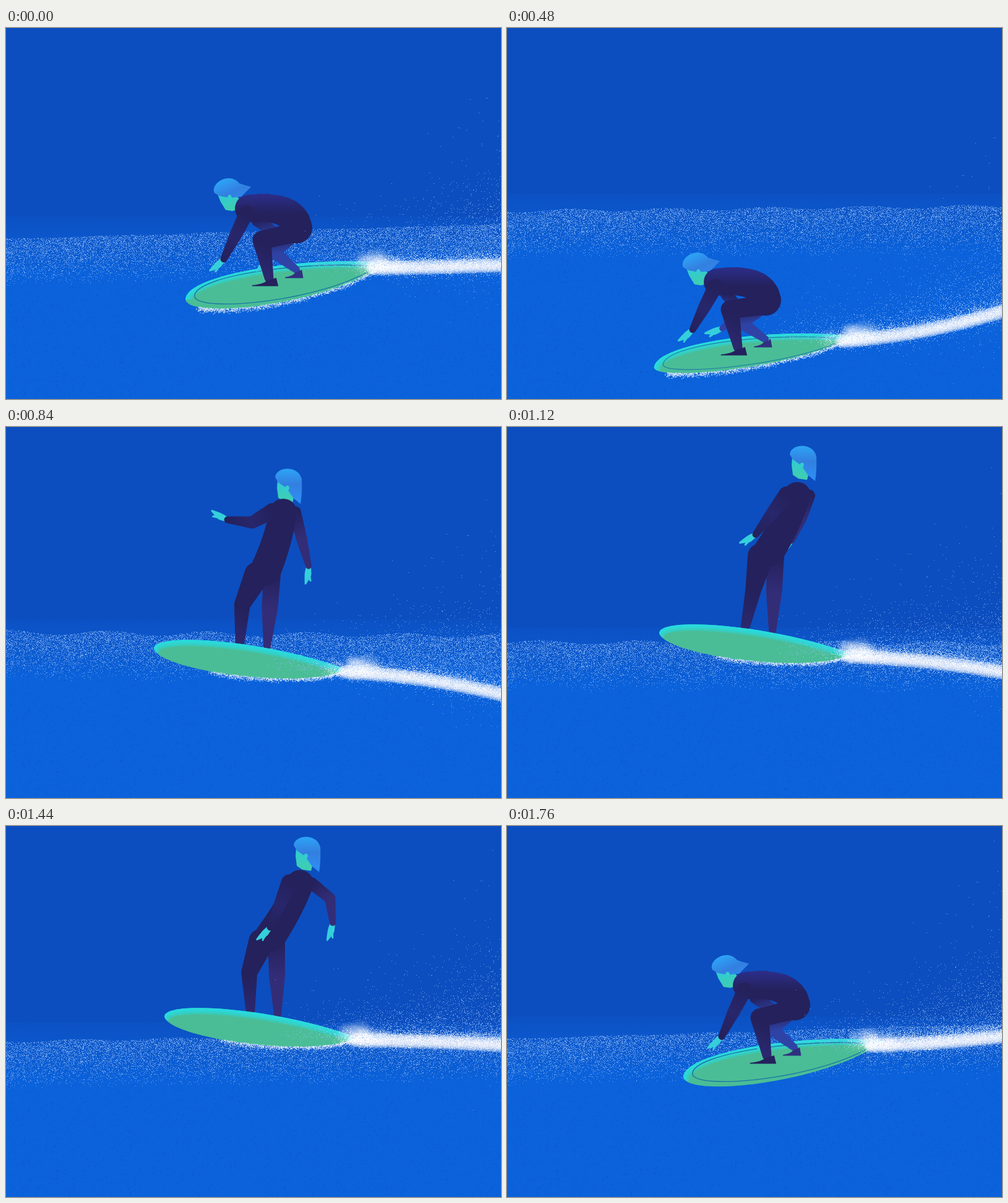
These frames come from a looping animation (800x600 px, 1800 ms). An HTML page with a canvas:

```html
<!DOCTYPE html>
<html>
<head>
<meta charset="utf-8">
<style>
html, body { margin: 0; width: 100%; height: 100%; overflow: hidden; background: #0c4ebf; }
canvas { display: block; }
</style>
</head>
<body>
<canvas id="stage" width="800" height="600"></canvas>
<script>
const ctx = document.getElementById('stage').getContext('2d');
const LOOP = 1800, STEP = 40, NAVY = '#24215c';

// Seeded particles
let seed = 7;
function rnd() {
  seed = (seed + 0x6D2B79F5) | 0;
  let n = Math.imul(seed ^ (seed >>> 15), 1 | seed);
  n = (n + Math.imul(n ^ (n >>> 7), 61 | n)) ^ n;
  return ((n ^ (n >>> 14)) >>> 0) / 4294967296;
}
const make = (n, fn) => Array.from({ length: n }, fn);
const gauss = () => rnd() + rnd() + rnd() + rnd() - 2;
const expo = () => -Math.log(1 - rnd());
const surfaceDots = make(12000, () => [rnd() * 800 | 0, 78 * (1 - Math.sqrt(rnd()))]);
const seaDots = make(3600, () => [rnd() * 800 | 0, 300 + rnd() * 300 | 0]);
const coreDots = make(3200, () => [rnd(), gauss(), gauss()]);
const sprayDots = make(3600, () => [rnd(), rnd() < 0.12 ? expo() * 0.4 : -expo()]);
const foamDots = make(1300, () => [rnd(), gauss(), Math.abs(gauss())]);
const puffs = make(12, () => [rnd(), gauss(), 10 + rnd() * 12]);

const clamp = v => Math.max(0, Math.min(1, v));
const ease = v => { v = clamp(v); return v * v * (3 - 2 * v); };
const mix = (a, b, k) => a + (b - a) * k;
const blend = (a, b, k) => a.map((v, i) => mix(v, b[i], k));
const add = (a, b) => [a[0] + b[0], a[1] + b[1]];
const frac = v => v - Math.floor(v);

// Time, front ankle x and y, wake height at the right edge
const PATH = [
  [0, 425, 408, 383], [240, 403, 500, 426], [480, 373, 520, 452], [840, 378, 347, 437],
  [1120, 385, 322, 400], [1440, 395, 297, 355], [1640, 408, 297, 333], [1760, 420, 375, 338]
];

// Smooth looping curve through the path points
function pathAt(t) {
  const n = PATH.length;
  const point = i => PATH[(i + n) % n].map((v, c) => c ? v : v + LOOP * Math.floor(i / n));
  let i = n - 1;
  while (PATH[i][0] > t) i--;
  const [p, a, b, q] = [i - 1, i, i + 1, i + 2].map(point);
  const d = b[0] - a[0], u = (t - a[0]) / d, w = 1 - u;
  return a.map((v, c) => {
    const slopeA = (b[c] - p[c]) / (b[0] - p[0]), slopeB = (q[c] - v) / (q[0] - a[0]);
    return v * w * w * (1 + 2 * u) + b[c] * u * u * (3 - 2 * u) + d * u * w * (slopeA * w - slopeB * u);
  }).slice(1);
}

// Body points relative to the front ankle; elbows and knees are solved
const CROUCH = { chest: [-33, -115], hip: [45, -84], head: [-62, -138], hand: [-73, -34], backHand: [0, -36] };
const REACH = { chest: [70, -207], hip: [42, -115], head: [80, -250], hand: [-20, -195], backHand: [111, -121] };
const LEAN = { chest: [84, -209], hip: [39, -120], head: [95, -262], hand: [17, -147], backHand: [75, -137] };
const TWIST = { chest: [80, -202], hip: [32, -117], head: [93, -250], hand: [32, -132], backHand: [133, -139] };
const POSES = [[0, CROUCH], [540, CROUCH], [840, REACH], [1120, LEAN], [1440, TWIST], [1760, CROUCH], [LOOP, CROUCH]];

function poseAt(t, place) {
  let i = 0;
  while (POSES[i + 1][0] <= t) i++;
  const [t0, a] = POSES[i], [t1, b] = POSES[i + 1], k = ease((t - t0) / (t1 - t0));
  return Object.fromEntries(Object.keys(a).map(name => [name, place(blend(a[name], b[name], k))]));
}

// Two-bone chain from a to b, bending to the given side
function chain(a, b, l1, l2, side) {
  const dx = b[0] - a[0], dy = b[1] - a[1], d = Math.hypot(dx, dy);
  const far = d >= l1 + l2;
  const along = far ? d * l1 / (l1 + l2) : (l1 * l1 - l2 * l2 + d * d) / (2 * d);
  const out = far ? 0 : side * Math.sqrt(Math.max(0, l1 * l1 - along * along));
  return [a, [a[0] + (dx * along - dy * out) / d, a[1] + (dy * along + dx * out) / d], b];
}

function bezier(a, b, c, d, u) {
  const w = 1 - u;
  return [0, 1].map(i => w * w * w * a[i] + 3 * w * w * u * b[i] + 3 * w * u * u * c[i] + u * u * u * d[i]);
}

function gradient(a, b, ...colors) {
  const g = ctx.createLinearGradient(...a, ...b);
  colors.forEach((c, i) => g.addColorStop(i / (colors.length - 1), c));
  return g;
}

// Rounded body part made from circles along its joints
function limb(joints, radii, fill) {
  ctx.beginPath();
  for (let i = 0; i < joints.length - 1; i++) {
    for (let u = 0; u <= 1; u += 1 / 24) {
      const [x, y] = blend(joints[i], joints[i + 1], u), r = mix(radii[i], radii[i + 1], u);
      ctx.moveTo(x + r, y);
      ctx.arc(x, y, r, 0, 7);
    }
  }
  ctx.fillStyle = fill;
  ctx.fill();
}

function drawHand([, elbow, wrist]) {
  const angle = Math.atan2(wrist[1] - elbow[1], wrist[0] - elbow[0]) + 0.42;
  const at = (length, turn) => add(wrist, [length * Math.cos(angle + turn), length * Math.sin(angle + turn)]);
  limb([wrist, at(13, -0.1), at(29, 0)], [4, 5.5, 1.5], '#35cfdb');
  limb([at(10, 0), at(24, -0.3)], [4, 1.5], '#35cfdb');
}

function drawSea(t) {
  const turn = t / LOOP * 2 * Math.PI, cos = Math.cos(turn);
  const level = 326 - 6 * cos - 26 * Math.sin(turn) + 9 * Math.cos(2 * turn);
  const tilt = 9.5 + 15 * cos, swell = 2.2 - 1.6 * cos;
  const crest = 100 + (t - 480) * 320 / LOOP;
  ctx.fillStyle = '#0c4ebf';
  ctx.fillRect(0, 0, 800, 600);
  ctx.fillStyle = gradient([0, level - 24], [0, level + 70], '#0c51c4', '#0b59ce', '#0b62db');
  ctx.fillRect(0, level - 24, 800, 600);
  ctx.fillStyle = 'rgba(12,72,188,.75)';
  for (const [x, y] of seaDots) if (y > level + 45) ctx.fillRect(x, y, 1, 1);
  ctx.fillStyle = 'rgba(140,184,245,.75)';
  for (const [x, depth] of surfaceDots) {
    const line = level + tilt * (0.5 - x / 800) - swell * Math.cos((x - crest) * Math.PI / 80);
    ctx.fillRect(x, line + depth | 0, 1, 1);
  }
}

// Board outline: nose, tail and curve handles, turning from deck to underside
function boardAt(x, y, turn, roll) {
  const nose = [x + mix(-135, -139, turn), y + mix(31, 11, turn)];
  const from = (deck, hull) => add(nose, blend(deck, hull, turn));
  const tail = from([323, -58], [311, 34]);
  const top1 = from([2, -44], [2, -28]), top2 = from([221, -72], [190, -12]);
  const low1 = from([6, 34], [6, 36]), low2 = from([231, 10], [250, 70]);
  for (const p of [low1, low2]) {
    const chord = mix(nose[1], tail[1], (p[0] - nose[0]) / (tail[0] - nose[0]));
    p[1] = mix(chord, p[1], 1 - 0.4 * Math.sin(Math.PI * roll));
  }
  return { nose, tail, top1, top2, low1, low2 };
}

function drawBoard({ nose, tail, top1, top2, low1, low2 }, turn) {
  const upper = () => {
    ctx.beginPath();
    ctx.moveTo(...nose);
    ctx.bezierCurveTo(...top1, ...top2, ...tail);
  };
  const outline = () => {
    upper();
    ctx.bezierCurveTo(...low2, ...low1, ...nose);
  };
  ctx.save();
  outline();
  ctx.fillStyle = '#4abd96';
  ctx.fill();
  ctx.clip();
  ctx.strokeStyle = 'rgba(34,222,238,.22)';
  for (let w = 4; w <= 24; w += 3) {
    ctx.lineWidth = w;
    upper();
    ctx.stroke();
  }
  ctx.restore();

  ctx.save();
  ctx.globalAlpha = clamp(1 - turn * 2.5);
  const [cx, cy] = blend(nose, tail, 0.5);
  ctx.translate(cx, cy);
  ctx.scale(0.91, 0.82);
  ctx.translate(-cx, -cy);
  outline();
  ctx.strokeStyle = '#1c75a6';
  ctx.lineWidth = 1.7;
  ctx.stroke();
  ctx.restore();
}

function drawFoam({ nose, tail, low1, low2 }, start) {
  ctx.fillStyle = 'rgba(228,240,255,.75)';
  for (const [u, dx, drop] of foamDots) {
    if (u < start) continue;
    const [x, y] = bezier(nose, low1, low2, tail, u);
    ctx.fillRect(x + dx * 4, y - 1 + drop * 7 * (1 - u / 2), 1.3, 1.3);
  }
}

function drawHead(center, s) {
  const tip = blend([35, 3], [18, 30], s);
  ctx.save();
  ctx.translate(...center);
  ctx.rotate(-0.43 * (1 - s));
  ctx.beginPath();
  for (const p of [[-19, -10], [-20, 4], [-18, 20], [-9, 26], [5, 28], [9, 12], [4, -8]]) ctx.lineTo(...p);
  ctx.fillStyle = gradient([0, -5], [0, 26], '#30cbd2', '#40cdb0');
  ctx.fill();
  ctx.beginPath();
  ctx.moveTo(-23, -13);
  ctx.bezierCurveTo(-22, -30, 14, -34, 20, -10);
  ctx.quadraticCurveTo(...blend([26, -4], [21, 12], s), ...tip);
  ctx.lineTo(...blend([14, 11], [6, 20], s));
  ctx.lineTo(-4, 5);
  ctx.lineTo(-18, -5);
  ctx.fillStyle = gradient([0, -26], [0, 22], '#2da3f6', '#337fe0', '#2f8cf0');
  ctx.fill();
  ctx.beginPath();
  ctx.ellipse(-4, 5, 3.5, 5, 0.4, 0, 7);
  ctx.fillStyle = '#33cdd0';
  ctx.fill();
  ctx.restore();
}

function drawFoot([x, y], w, color) {
  ctx.beginPath();
  ctx.moveTo(x + 0.28 * w, y - 12);
  ctx.lineTo(x - 0.1 * w, y - 7);
  ctx.quadraticCurveTo(x - 0.2 * w, y - 2, x - 0.65 * w, y);
  ctx.lineTo(x - 0.65 * w, y + 1.5);
  ctx.lineTo(x + 0.36 * w, y + 1.5);
  ctx.fillStyle = color;
  ctx.fill();
}

function drawSurfer(x, y, t, s) {
  const sway = Math.sin(t / LOOP * 2 * Math.PI) * (1 - s);
  const place = p => [x + p[0], y + p[1] * (1 + (0.01 - 0.06 * sway))];
  const body = poseAt(t, place);
  const { chest, hip } = body;
  const near = (p, low, high) => add(p, blend(low, high, s));
  const foot = [x, y + mix(-4, 2, s)], backFoot = [x + 44, y + mix(-17, 8, s)];
  const reach = mix(0.76, 1, s);

  const arm = chain(near(chest, [-3, 7], [-17, -2]), body.hand, 38, 40, -1);
  const backArm = chain(near(chest, [15, 20], [19, 0]), add(body.backHand, [-25 * sway, 0]), 38, 40, -1);
  const leg = chain(near(hip, [-4, 8], [-14, 8]), foot, 54, 62, 1);
  const backLeg = chain(near(hip, [-8, 10], [10, 8]), backFoot, 54 * reach, 62 * reach, 1);
  const bow = add(blend(chest, hip, 0.5), blend([34, -22], [6, 0], s));
  const spine = make(9, (_, i) => blend(blend(chest, bow, i / 8), blend(bow, hip, i / 8), i / 8));
  const crouched = s < 0.5, shade = crouched ? '#2f43a6' : '#332d78';

  drawHand(backArm);
  limb(backArm, [10, 9, 5], gradient(backArm[0], backArm[2], NAVY, shade, shade));
  limb(backLeg, [14, mix(11, 13, s), 6], gradient(backLeg[0], backLeg[2], NAVY, shade, shade));
  if (crouched) drawFoot([backFoot[0] + 1, backFoot[1] + 12], 29, '#30307f');
  drawHead(body.head, s);
  const back = crouched ? '#2b2d86' : NAVY;
  limb(spine, spine.map((_, i) => mix(22, 25, i / 8)), gradient([x, bow[1] - 14], [x, bow[1] + 14], back, NAVY));
  limb(leg, [mix(16, 21, s), mix(15, 13, s), 7.5], gradient(leg[0], leg[2], NAVY, NAVY, '#2b2870'));
  if (crouched) drawFoot([x, y + 8], 42, NAVY);
  drawHand(arm);
  limb(arm, [mix(12, 13, s), 10, 5.5], gradient(arm[0], arm[2], NAVY, '#28276c', NAVY));
}

function drawWake(tail, t, turn, endY) {
  const start = add(tail, blend([-20, 7], [-2, 4], turn)), end = [820, endY];
  const bend = 0.34 * (start[1] - endY);
  const ctrl = add(blend(start, end, 0.5), [0, bend]);
  const wakeY = x => {
    const u = clamp((x - start[0]) / (end[0] - start[0]));
    return mix(mix(start[1], ctrl[1], u), mix(ctrl[1], end[1], u), u);
  };
  const drift = (u, laps) => frac(u + laps * t / LOOP);

  ctx.lineCap = 'round';
  ctx.strokeStyle = 'rgba(243,242,250,.2)';
  for (let w = 6; w <= 24; w += 2) {
    ctx.lineWidth = w;
    ctx.beginPath();
    ctx.moveTo(...start);
    ctx.quadraticCurveTo(...ctrl, ...end);
    ctx.stroke();
  }
  for (const [u0, g, r] of puffs) {
    const u = drift(u0, 5), x = start[0] - 30 + 90 * u, y = wakeY(x) - 6 + g * 7;
    const glow = ctx.createRadialGradient(x, y, 0, x, y, r);
    glow.addColorStop(0, `rgba(255,255,255,${0.45 * Math.sin(Math.PI * u)})`);
    glow.addColorStop(1, 'rgba(255,255,255,0)');
    ctx.fillStyle = glow;
    ctx.fillRect(x - r, y - r, 2 * r, 2 * r);
  }
  ctx.fillStyle = 'rgba(150,192,250,.7)';
  for (const [u0, rise] of sprayDots) {
    const u = drift(u0, 4), x = start[0] - 130 + (930 - start[0]) * Math.sqrt(u);
    ctx.fillRect(x | 0, wakeY(x) - 3 + rise * 30 * (0.5 + u) | 0, 1, 1);
  }
  ctx.fillStyle = 'rgba(255,255,255,.7)';
  for (const [u0, dx, dy] of coreDots) {
    const x = start[0] - 10 + (830 - start[0]) * drift(u0, 6) + dx * 26;
    ctx.fillRect(x | 0, wakeY(x) - 3 + dy * 14 | 0, 1, 1);
  }
}

function draw(t) {
  const [x, y, wakeEnd] = pathAt(t);
  const down = ease((t - 1440) / 320);
  const rise = (from) => ease((t - from) / (840 - from)) * (1 - down);
  const stand = rise(540), turn = rise(400), roll = rise(300);
  const board = boardAt(x, y, turn, roll);
  drawSea(t);
  if (stand >= 0.5) drawSurfer(x, y, t, stand);
  drawBoard(board, turn);
  drawFoam(board, mix(0.17 + 0.22 * stand, 1, down));
  if (stand < 0.5) drawSurfer(x, y, t, stand);
  drawWake(board.tail, t, turn, wakeEnd);
}

let last = -1;
function tick() {
  const t = Math.floor(performance.now() % LOOP / STEP) * STEP;
  if (t !== last) draw(last = t);
  requestAnimationFrame(tick);
}
tick();
</script>
</body>
</html>
```
